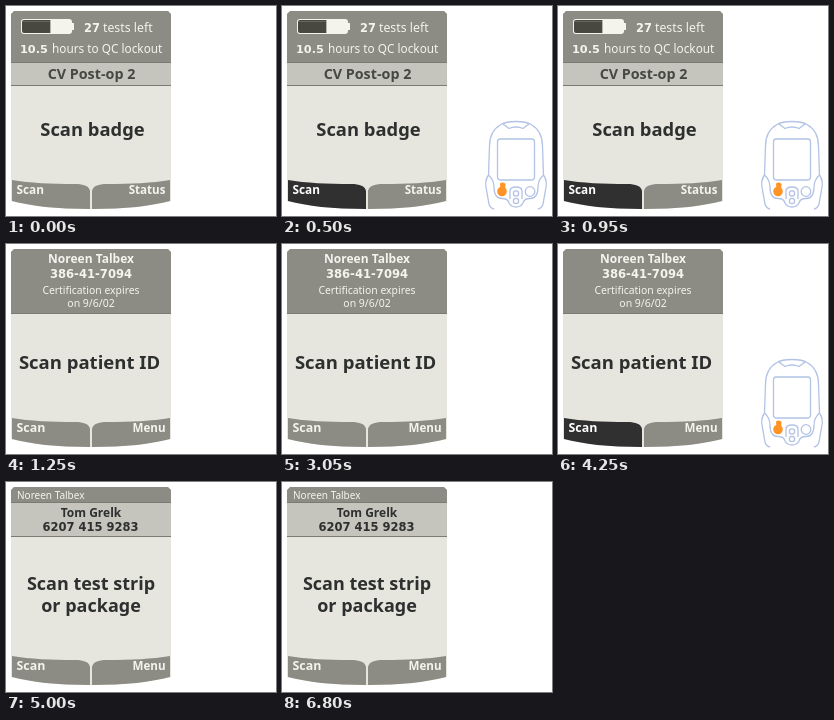
Recreate the animation shown at these times as an HTML page with a canvas. Size 270 by 210 pixels, loop 8 s.

```html
<!DOCTYPE html>
<html lang="en">
<head>
<meta charset="utf-8">
<title>Meter screens</title>
<style>
  html, body { margin: 0; width: 100%; height: 100%; overflow: hidden; background: #fff; }
  canvas { display: block; width: 270px; height: 210px; }
</style>
</head>
<body>
<canvas id="stage" width="270" height="210"></canvas>
<script>
const canvas = document.getElementById('stage');
const ctx = canvas.getContext('2d');
const ratio = window.devicePixelRatio || 1;
canvas.width = 270 * ratio;
canvas.height = 210 * ratio;

const HEAD = '#8c8c84', BAR = '#c5c5bd', BODY = '#e6e6de', EDGE = '#7b7b73';
const DARK = '#303030', INK = '#2e3030', PALE = '#f4f4ed';
const BLUE = '#b3c3e6', ORANGE = '#ff9326';
const SANS = '"Noto Sans", "Open Sans", sans-serif';
const DIGITS = '"DejaVu Sans", Verdana, sans-serif';
const LOOP = 8000;
const OPERATOR = 'Noreen Talbex';

function text(str, x, y, size, color, { bold = true, align = 'center', family = SANS } = {}) {
  ctx.font = `${bold ? 'bold ' : ''}${size}px ${family}`;
  ctx.textAlign = align;
  ctx.fillStyle = color;
  ctx.fillText(str, x, y);
}

function rect(x, y, w, h, color) {
  ctx.fillStyle = color;
  ctx.fillRect(x, y, w, h);
}

function shape(d, fill, stroke) {
  const path = new Path2D(d);
  if (fill) { ctx.fillStyle = fill; ctx.fill(path); }
  if (stroke) { ctx.strokeStyle = stroke; ctx.stroke(path); }
}

function circle(x, y, r, fill, stroke) {
  shape(`M${x - r} ${y} a${r} ${r} 0 1 1 ${2 * r} 0 a${r} ${r} 0 1 1 ${-2 * r} 0 Z`, fill, stroke);
}

// Draws once as given and once flipped about the vertical line at x.
function mirrored(x, paint) {
  paint(false);
  ctx.save();
  ctx.translate(2 * x, 0);
  ctx.scale(-1, 1);
  paint(true);
  ctx.restore();
}

function panel(headBottom) {
  shape('M5 8 L8 5 H162 L165 8 V195 C145 200 120 203 85 203 C50 203 25 200 5 195 Z', BODY);
  shape(`M5 8 L8 5 H162 L165 8 V${headBottom} H5 Z`, HEAD);
  rect(5, headBottom - 1, 160, 1, EDGE);
}

function strip(top, bottom) {
  rect(5, top, 160, bottom - top, BAR);
  rect(5, bottom, 160, 1, EDGE);
}

function tabs(right, pressed, leftSize = 12.4) {
  mirrored(85, flipped => shape(
    'M6 174 C24 177 45 178 69 178 C78 178 83 180 84 185 V203 C50 203 25 200 6 195 Z',
    pressed && !flipped ? DARK : HEAD));
  text('Scan', 10.5, 188, leftSize, pressed ? '#fff' : PALE, { align: 'left' });
  text(right, 159.5, 188, 11.6, PALE, { align: 'right' });
}

function battery() {
  shape('M18 13 H63 Q66 13 66 16 V17 H68 V24 H66 V25 Q66 28 63 28 H18 Q15 28 15 25 V16 Q15 13 18 13 Z', PALE);
  shape('M18 14 H44 V27 H18 Q16 27 16 25 V16 Q16 14 18 14 Z', '#484841');
  rect(17, 15, 27, 1, '#66665e');
  rect(44, 14, 1, 13, '#b5b5ac');
}

function device() {
  ctx.lineWidth = 1.3;
  mirrored(234, flipped => {
    // Half of the case, with its grip and leg
    shape('M234 115.5 C227 115.5 222 116.5 219 118.5 C211 123 207.5 130 207.5 140 L206.5 169 C203.5 173 203 178 204.5 184 L207 198 Q208 202 212 203', null, BLUE);
    shape('M221 118 L227 122.5 Q230 121 234 121', null, BLUE);
    // Key area below the display
    shape('M206.5 169 Q212 174 212 181 C212 189 215 192.5 220 192.5 Q226 192.5 227 197 Q229 201 234 201', null, BLUE);
    circle(220, 185.5, 4.8, flipped ? '#fff' : ORANGE, flipped ? BLUE : null);
    if (!flipped) shape('M218 177.5 Q221 175.5 223.5 178 L223 184 H218.5 Z', ORANGE);
  });
  shape('M218 133 H250 Q252.5 133 252.5 136 V171 Q252.5 174 249 174 H219 Q215.5 174 215.5 171 V136 Q215.5 133 218 133 Z', '#fff', BLUE);
  shape('M228 193 V185 Q228 181 234 181 Q240 181 240 185 V193', null, BLUE);
  circle(234, 187.5, 2.6, '#fff', BLUE);
  circle(234, 195, 2.6, '#fff', BLUE);
}

function badgeScreen(pressed) {
  panel(57);
  strip(57, 79);
  battery();
  text('27', 78, 26, 11.4, PALE, { align: 'left', family: DIGITS });
  text('tests left', 97, 26, 12.3, PALE, { align: 'left', bold: false });
  text('10.5', 14, 47, 11.3, PALE, { align: 'left', family: DIGITS });
  text('hours to QC lockout', 46, 47, 11.8, PALE, { align: 'left', bold: false });
  text('CV Post-op 2', 85.5, 73, 14.3, '#464842');
  text('Scan badge', 86.5, 130, 18.4, INK);
  tabs('Status', pressed, 11.8);
}

function patientScreen(pressed) {
  panel(70);
  text(OPERATOR, 85, 19, 12, PALE);
  text('386-41-7094', 85, 34, 11.6, PALE, { family: DIGITS });
  text('Certification expires', 85, 50, 10.4, PALE, { bold: false });
  text('on 9/6/02', 85, 63, 10.5, PALE, { bold: false });
  text('Scan patient ID', 83.5, 125, 18.5, INK);
  tabs('Menu', pressed);
}

function testScreen() {
  panel(21);
  strip(21, 54);
  text(OPERATOR, 11, 17, 10, PALE, { align: 'left', bold: false });
  text('Tom Grelk', 85, 35, 12, INK);
  text('6207 415 9283', 84.5, 49, 11.5, INK, { family: DIGITS });
  text('Scan test strip', 85, 108, 18, INK);
  text('or package', 85, 130, 18, INK);
  tabs('Menu', false);
}

function draw(t) {
  ctx.setTransform(ratio, 0, 0, ratio, 0, 0);
  rect(0, 0, 270, 210, '#fff');
  const pressed = (t >= 500 && t < 1250) || (t >= 4250 && t < 5000);
  if (t < 1250) badgeScreen(pressed);
  else if (t < 5000) patientScreen(pressed);
  else testScreen();
  if (pressed) device();
}

const start = performance.now();
function tick() {
  draw((performance.now() - start) % LOOP);
  requestAnimationFrame(tick);
}
tick();
</script>
</body>
</html>
```
